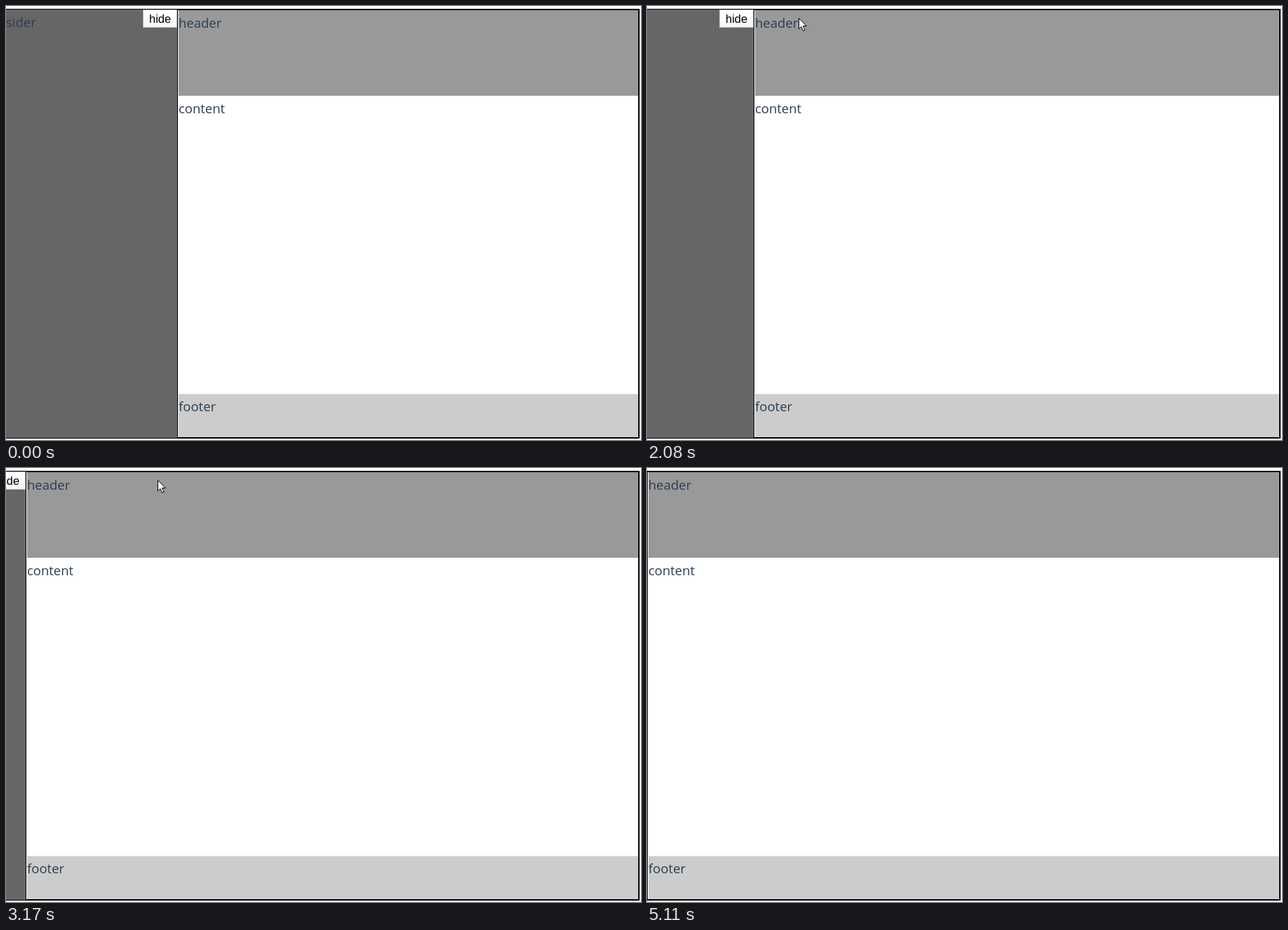
These frames come from a looping animation (905 by 619 pixels, 5820 ms). An HTML page:

```html
<!DOCTYPE html>
<html>
<head>
<meta charset="utf-8">
<style>
html, body { margin: 0; width: 100%; height: 100%; overflow: hidden; background: #fff; }
svg { display: block; }
text { font: 18.5px "Open Sans", "Noto Sans", sans-serif; fill: #2c3e50; }
.label { font: 16.5px "Liberation Sans", Arial, sans-serif; fill: #000; }
</style>
</head>
<body>
<svg width="905" height="619" viewBox="0 0 905 619">
  <defs>
    <linearGradient id="face" x2="0" y2="1">
      <stop offset=".4" stop-color="#fff"/>
      <stop offset="1" stop-color="#f3f3f3"/>
    </linearGradient>
  </defs>
  <path d="M0 4H903V617H0Z"/>
  <g id="layout">
    <rect y="5" width="244" height="611" fill="#666"/>
    <text x="0" y="29.5">sider</text>
    <rect id="button" x="195.5" y="5.5" width="48" height="25" fill="url(#face)" stroke="#b4b4b4"/>
    <text class="label" x="204" y="24">hide</text>
    <path d="M244 4H1200V617H244Z"/>
    <path d="M245 6H1200V615H245Z" fill="#fff"/>
    <path d="M246 6H1200V128H246Z" fill="#999"/>
    <path d="M246 553.5H1200V615H246Z" fill="#ccc"/>
    <text x="246" y="30.5">header</text>
    <text x="246" y="152.5">content</text>
    <text x="246" y="578">footer</text>
  </g>
  <path d="M901 4H903V617H901Z"/>
  <path d="M903 0H905V619H903Z" fill="#fff"/>
  <path id="cursor" d="M.5 .5V15.8L4 12.5L6.5 18.4L9 17.3L6.5 11.5H11.3Z" fill="#fff" stroke="#000"/>
</svg>
<script>
const LOOP = 5820, TICK = 77.9, SLIDE_START = 1372, SLIDE_TIME = 3000, WIDTH = 244;
const $ = id => document.getElementById(id);

// pointer paths: [tick, x, y]
const enter = [[-7, 704, 573], [-6, 390, 330], [-5, 89, 90]];
const press = [[0, 27, 0], [1, 90, 9], [2, 150, 15], [3, 190, 20], [4, 206, 21], [7, 216, 17]];

function along(path, n) {
  for (let i = 1; i < path.length; i++) {
    const [a, ax, ay] = path[i - 1], [b, bx, by] = path[i];
    if (n <= b) {
      const u = (n - a) / (b - a);
      return [ax + (bx - ax) * u, ay + (by - ay) * u];
    }
  }
  return path[path.length - 1].slice(1);
}

function pointer(n) {
  if (n < -7 || n > 56 || (n > -5 && n < 0)) return null;
  if (n < 0) return along(enter, n);
  if (n < 50) return along(press, n);
  const u = ((n - 49) / 7) ** 1.5;
  return [216 + 596 * u, 17 + 585 * u];
}

// cubic-bezier(.25, .1, .25, 1)
function ease(t) {
  if (t <= 0) return 0;
  if (t >= 1) return 1;
  let lo = 0, hi = 1, u;
  for (let i = 0; i < 25; i++) {
    u = (lo + hi) / 2;
    if (.75 * u * (1 - u) + u ** 3 < t) lo = u; else hi = u;
  }
  return .3 * u * (1 - u) ** 2 + 3 * u * u * (1 - u) + u ** 3;
}

function draw(now) {
  const n = Math.floor((now % LOOP - 668) / TICK);
  const shift = Math.round(WIDTH * ease((675 + n * TICK - SLIDE_START) / SLIDE_TIME));
  $("layout").setAttribute("transform", `translate(${-shift})`);
  $("button").setAttribute("stroke", n >= 3 && n < 9 ? "#e4e4e4" : "#b4b4b4");
  const at = pointer(n);
  $("cursor").setAttribute("visibility", at ? "visible" : "hidden");
  if (at) $("cursor").setAttribute("transform", `translate(${at.map(Math.round)})`);
}

const start = performance.now();
function loop() {
  draw(performance.now() - start);
  requestAnimationFrame(loop);
}
loop();
</script>
</body>
</html>
```
